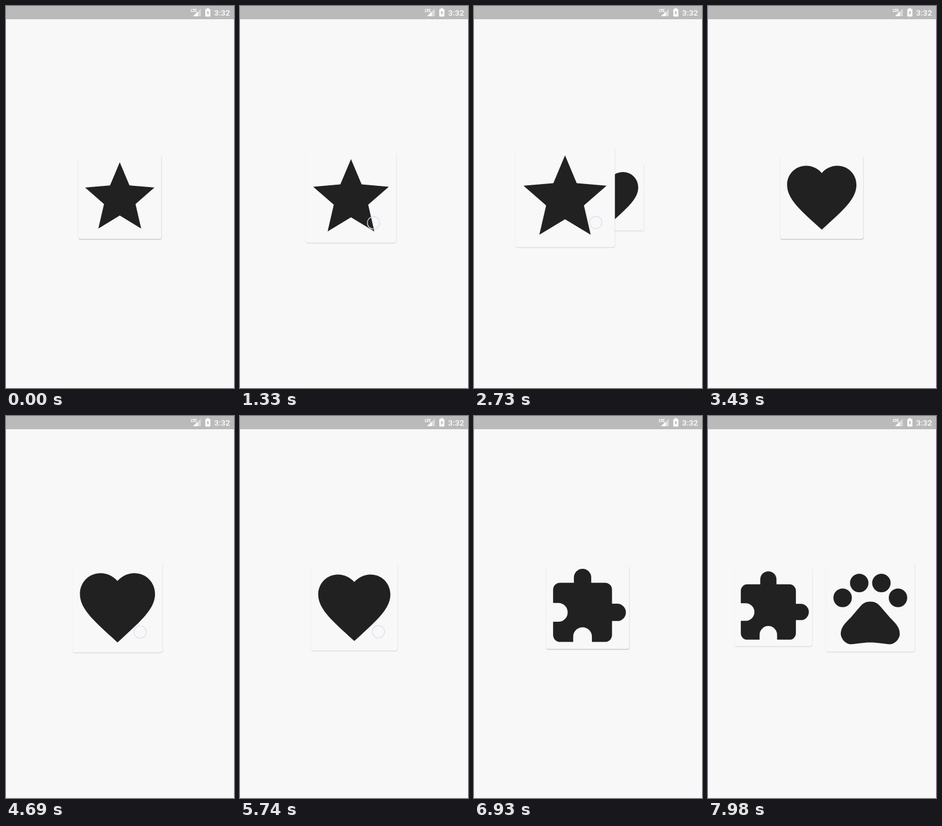
Write an HTML page with a canvas that moves like this. It is 381 px wide and 635 px high and loops after 8000 ms.

```html
<!DOCTYPE html>
<html lang="en">
<head>
<meta charset="utf-8">
<title>Card carousel</title>
<style>
html, body { margin: 0; width: 100%; height: 100%; overflow: hidden; background: #f8f8f8; }
canvas { display: block; width: 381px; height: 635px; }
</style>
</head>
<body>
<canvas id="stage" width="381" height="635"></canvas>
<script>
const ctx = document.getElementById('stage').getContext('2d');
const LOOP = 8000, STEP = 70, TAU = 2 * Math.PI;
const CX = 190.1, CY = 317.7, SIZE = 139, ORBIT = 0.3 * SIZE, DEPTH = 0.2;
const BAR = '#bababa';

// Icons on a 24 unit grid
function star() {
  const path = new Path2D();
  for (let i = 0; i < 10; i++) {
    const r = i % 2 ? 4.78 : 10.51, a = i * TAU / 10;
    path.lineTo(12 + r * Math.sin(a), 12.51 - r * Math.cos(a));
  }
  return path;
}

function paw() {
  const path = new Path2D('M12 10.5c1.26 0 2.06.51 2.86 1.45l2.48 2.91c1.31 1.31 2.92 2.76 2.61 4.8' +
    '-.29 1-1 2-2.33 2.32-.73.14-3.1-.44-5.62-.44s-4.9.58-5.62.44c-1.33-.32-2.04-1.32-2.33-2.32' +
    '-.31-2.04 1.3-3.49 2.61-4.8l2.48-2.91c.8-.94 1.6-1.45 2.86-1.45z');
  for (const side of [-1, 1]) {
    for (const [dx, y] of [[7.5, 9.5], [3, 5.5]]) {
      path.moveTo(14.5 + side * dx, y);
      path.arc(12 + side * dx, y, 2.5, 0, TAU);
    }
  }
  return path;
}

const heart = new Path2D('M12 21.35l-1.45-1.32C5.4 15.36 2 12.28 2 8.5 2 5.42 4.42 3 7.5 3' +
  'c1.74 0 3.41.81 4.5 2.09C13.09 3.81 14.76 3 16.5 3 19.58 3 22 5.42 22 8.5c0 3.78-3.4 6.86-8.55 11.54z');
const puzzle = new Path2D('M20.5 11H19V7a2 2 0 0 0-2-2h-4V3.5a2.5 2.5 0 0 0-5 0V5H4a2 2 0 0 0-2 2v3.8h1.5' +
  'a2.7 2.7 0 0 1 0 5.4H2V20a2 2 0 0 0 2 2h3.8v-1.5a2.7 2.7 0 0 1 5.4 0V22H17a2 2 0 0 0 2-2v-4h1.5' +
  'a2.5 2.5 0 0 0 0-5z');
const icons = [star(), heart, puzzle, paw()];

// Eased moves [start, end, angle reached]; a full turn brings the next card to the front
const moves = [
  [1190, 1610, 109], [1680, 1750, 116], [1750, 2310, 27], [2450, 2800, 91], [3080, 3430, 360],
  [3710, 4270, 476], [4410, 5040, 255], [5460, 6010, 436], [6510, 6580, 451], [6580, 6930, 720],
  [7630, 8330, 1118]
];
const touches = [[1260, 3080], [3780, 6580], [7700, 7840]];

function angleAt(t) {
  return moves.reduce((angle, [from, to, goal]) => {
    const u = Math.min(1, Math.max(0, (t - from) / (to - from)));
    return angle + (goal - angle) * (1 - Math.cos(Math.PI * u)) / 2;
  }, 0);
}

function poly(color, ...points) {
  ctx.fillStyle = color;
  ctx.beginPath();
  points.forEach(p => ctx.lineTo(...p));
  ctx.fill();
}

function label(text, x, y, font, spacing) {
  ctx.font = font + ' Roboto, sans-serif';
  ctx.letterSpacing = spacing;
  ctx.fillText(text, x, y);
}

function statusBar() {
  ctx.fillStyle = BAR;
  ctx.fillRect(0, 0, 381, 22);
  poly('#dadada', [325.5, 4.5], [325.5, 17], [312.5, 17]);
  poly('#fff', [320.5, 9.5], [320.5, 17], [312.5, 17]);
  ctx.fillStyle = BAR;
  ctx.fillRect(308, 3, 11, 8);
  ctx.fillStyle = '#fff';
  label('LTE', 308.7, 10, '700 7.5px', '-1px');
  label('3:32', 347.8, 16, '500 13.5px', '0px');
  ctx.beginPath();
  ctx.roundRect(333, 5, 8.5, 12.5, 1);
  ctx.rect(335.5, 3.6, 3.5, 2);
  ctx.fill();
  poly(BAR, [338, 7], [335, 12], [336.8, 12], [336.8, 15.5], [339.7, 10.5], [338, 10.5]);
}

function card({ icon, dx, scale }) {
  ctx.save();
  ctx.translate(CX + dx, CY);
  ctx.scale(scale, scale);
  ctx.shadowColor = 'rgba(0,0,0,.15)';
  ctx.shadowBlur = 1.5;
  ctx.shadowOffsetX = 0.3;
  ctx.shadowOffsetY = 1;
  ctx.fillStyle = '#f8f8f8';
  ctx.beginPath();
  ctx.roundRect(-SIZE / 2, -SIZE / 2, SIZE, SIZE, 4);
  ctx.fill();
  ctx.shadowColor = 'transparent';
  ctx.scale(SIZE / 24, SIZE / 24);
  ctx.translate(-12, -12);
  ctx.fillStyle = '#212121';
  ctx.fill(icons[icon % icons.length]);
  ctx.restore();
}

// Two neighbouring cards circle each other, seen from the side
function carousel(angle) {
  const front = Math.floor(angle / 360), a = angle % 360 / 360 * TAU;
  const dx = ORBIT * (1 - Math.cos(a)), grow = DEPTH * Math.sin(a);
  [
    { icon: front + 1, dx, scale: 1 - grow },
    { icon: front, dx: -dx, scale: 1 + grow }
  ].sort((p, q) => p.scale - q.scale).forEach(card);
}

function finger(t, angle) {
  const i = touches.findIndex(([from, to]) => t >= from && t <= to);
  if (i < 0) return;
  const grip = t < 5100 ? 232.5 : 227.2;
  ctx.strokeStyle = '#dddcf2';
  ctx.lineWidth = 1.2;
  ctx.beginPath();
  ctx.arc(grip - (angle - 360 * i) / 2.92, 361 - t / 2400, 10.3, 0, TAU);
  ctx.stroke();
}

function draw(now) {
  const t = Math.floor(now % LOOP / STEP) * STEP;
  const angle = angleAt(t);
  ctx.fillStyle = '#f8f8f8';
  ctx.fillRect(0, 0, 381, 635);
  statusBar();
  carousel(angle);
  finger(t, angle);
}

const start = performance.now();
function tick() {
  draw(performance.now() - start);
  requestAnimationFrame(tick);
}
tick();
</script>
</body>
</html>
```
